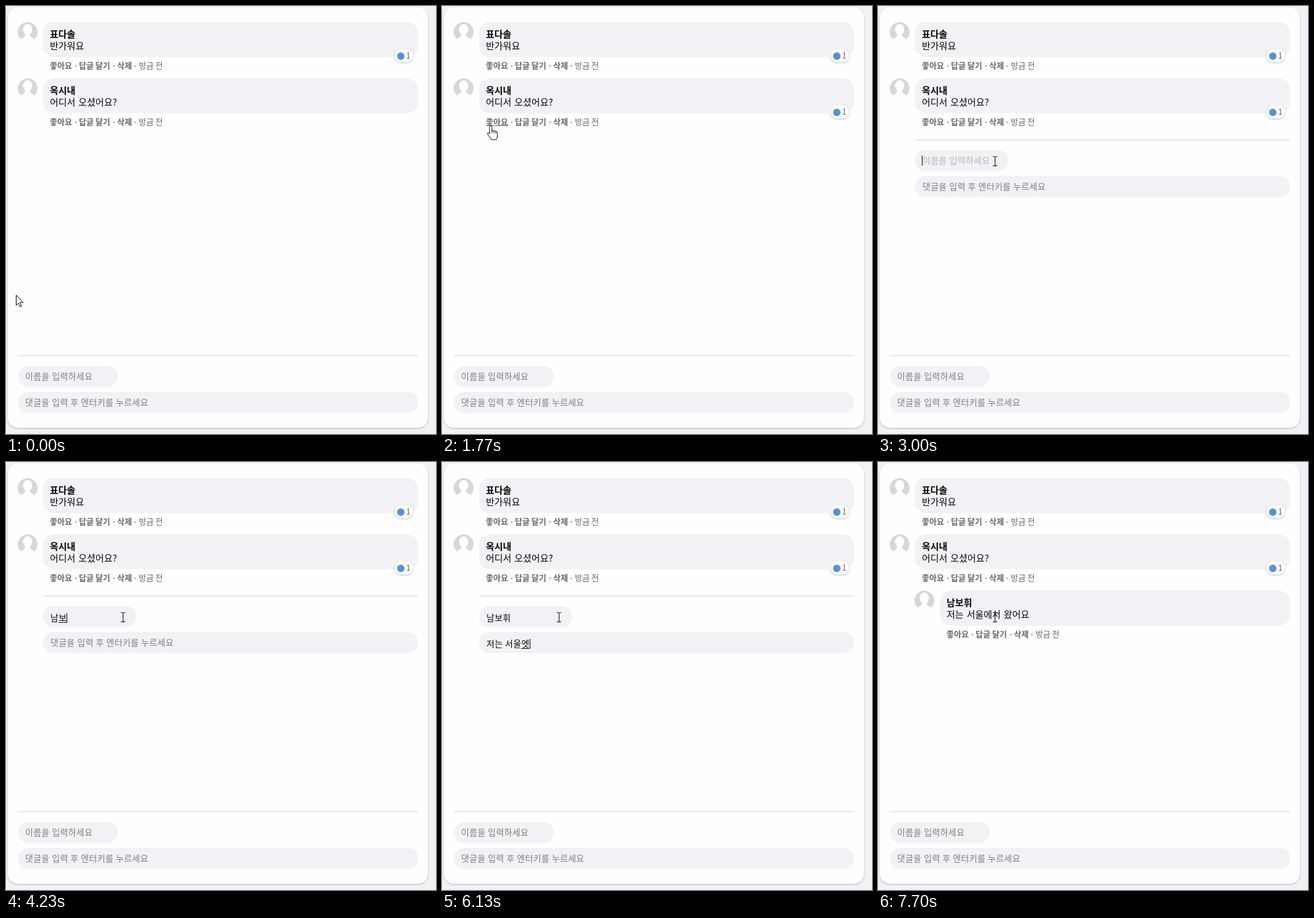
An HTML page with a canvas for the animation above (8 s loop, 696 by 692 pixels).

```html
<!DOCTYPE html>
<html lang="ko">
<head>
<meta charset="utf-8">
<style>
html, body { margin: 0; width: 100%; height: 100%; overflow: hidden; background: #f0f2f5; }
canvas { display: block; }
</style>
</head>
<body>
<canvas id="stage" width="696" height="692"></canvas>
<script>
const ctx = document.getElementById('stage').getContext('2d');
const LOOP = 8000;
const FONT = '"Noto Sans CJK KR", "Noto Sans CJK", "Noto Sans CJK JP", sans-serif';
const C = {
  page: '#f0f2f5', card: '#fefefe', bubble: '#f0f2f5', line: '#d0d2d4', avatar: '#d6d7da',
  ink: '#050505', action: '#65676b', hint: '#7c7d80', hintDim: '#b6b7ba', like: '#5590e0'
};
const BODY = { size: 15, word: 1.5 };
const BOLD = { ...BODY, weight: 700 };
const INPUT = { size: 14, letter: 0.3, word: 0.3 };
const SMALL = { size: 13 };
const LINK = { size: 13, weight: 700 };

const LIKE_AT = 1400, FORM_AT = 2250, FOCUS_AT = 2750, TAB_AT = 4850, COMMIT_AT = 7630, SEND_AT = 7660;
const NAME = '남보휘', REPLY = '저는 서울에서 왔어요';

// Each key press yields one state of the syllable being composed.
const keys = (start, step, prefix, states) =>
  states.split('|').map((s, i) => ({ t: start + i * step, text: prefix + s }));

const nameKeys = keys(3300, 200, '', 'ㄴ|나|남|남ㅂ|남보|남봏|남보후|남보휘');
const replyKeys = [
  ...keys(5030, 0, '', 'ㅈ'),
  ...keys(5230, 75, '', '저|전|저느|저는|저는 |저는 ㅅ|저는 서|저는 성|저는 서우|저는 서울|저는 서울ㅇ|저는 서울에'),
  ...keys(6130, 100, '저는 서울', '엣|에서|에서 |에서 ㅇ|에서 오|에서 와'),
  ...keys(7070, 100, '저는 서울에서 ', '왔|왔ㅇ|왔어|왔엉|왔어요')
];

const pointer = [
  [0, 16, 467], [50, 16, 467], [700, 91, 185], [900, 91, 185], [1150, 79, 193],
  [1820, 79, 193], [2150, 140, 190], [2330, 140, 190], [2700, 189, 251], [LOOP, 189, 251]
];
const ARROW = new Path2D('M.5.5V17L4.2 13.4 6.8 19.3 9.2 18.3 6.6 12.4H11.8Z');
const HAND = new Path2D('M-2 2.3a1.9 1.9 0 0 1 3.8 0V8.5q2.4-1 3.2.7 2.3-.8 3 .9 2.7-.4 2.7 2.3V17q0 3-1.8 6H.6Q-1 19.5-5 14.5q-1.4-2.6.8-2.7L-2 14Z');

function box(x, y, w, h, r, fill) {
  ctx.fillStyle = fill;
  ctx.beginPath();
  ctx.roundRect(x, y, w, h, r);
  ctx.fill();
}

function rect(x, y, w, h, fill) {
  ctx.fillStyle = fill;
  ctx.fillRect(x, y, w, h);
}

function disc(x, y, r, fill) {
  ctx.fillStyle = fill;
  ctx.beginPath();
  ctx.arc(x, y, r, 0, 7);
  ctx.fill();
}

function shadowed(draw) {
  ctx.save();
  ctx.shadowColor = 'rgba(0, 0, 0, 0.25)';
  ctx.shadowBlur = 3;
  ctx.shadowOffsetY = 1;
  draw();
  ctx.restore();
}

// Places text by its visual middle and returns its width.
function label(text, x, mid, style, color) {
  const { size, weight = 400, letter = 0, word = 0 } = style;
  ctx.font = `${weight} ${size}px ${FONT}`;
  ctx.letterSpacing = letter + 'px';
  ctx.wordSpacing = word + 'px';
  ctx.fillStyle = color;
  ctx.fillText(text, x, Math.round(mid + size * 0.38));
  return ctx.measureText(text).width;
}

function avatar(x, y) {
  ctx.save();
  ctx.beginPath();
  ctx.arc(x, y, 16, 0, 7);
  ctx.clip();
  rect(x - 16, y - 16, 32, 32, C.avatar);
  ctx.fillStyle = C.card;
  ctx.beginPath();
  ctx.ellipse(x, y - 4, 7.5, 9, 0, 0, 7);
  ctx.fill();
  ctx.fill(new Path2D(`M${x - 4} ${y}h8v6q1 3 8 5v7h-24v-7q7-2 8-5Z`));
  ctx.restore();
}

function badge(y) {
  shadowed(() => box(629, y, 30, 22, 11, C.card));
  disc(639, y + 12, 6, C.like);
  label('1', 647.5, y + 11, SMALL, C.action);
}

function comment(x, y, name, text, liked, hover) {
  avatar(x + 16, y + 16);
  box(x + 41, y, 626 - x, 56.5, 18, C.bubble);
  const left = x + 52;
  label(name, left, y + 19, BOLD, C.ink);
  label(text, left, y + 38, BODY, C.ink);
  const mid = y + 70;
  label('좋아요', left, mid, LINK, C.action);
  label('답글 달기', left + 47, mid, LINK, C.action);
  label('삭제', left + 109, mid, LINK, C.action);
  label('방금 전', left + 144, mid, SMALL, C.action);
  for (const dx of [42, 104, 138]) disc(left + dx, mid + 1, 0.9, C.action);
  if (hover === 'like') rect(left, mid + 6, 36, 1, C.action);
  if (hover === 'reply') rect(left + 47, mid + 6, 51, 1, C.action);
  if (liked) badge(y + 43);
}

function field(x, y, w, hint, state) {
  box(x, y, w, 34, 17, C.bubble);
  const left = x + 12, mid = y + 17;
  const { text = '', focus = false, composing = false, caret = false } = state || {};
  let end = left;
  if (text) {
    end += label(text, left, mid + 1.5, INPUT, C.ink);
    if (composing && !text.endsWith(' ')) {
      const last = ctx.measureText(text.slice(-1)).width;
      rect(Math.round(end - last), mid + 9, Math.round(last), 1, C.ink);
    }
  } else {
    label(hint, left, mid - 0.5, INPUT, focus ? C.hintDim : C.hint);
  }
  if (caret) rect(Math.round(end) - (text ? 0 : 1), mid + (text ? -6 : -8), 1, 16, '#000');
}

function form(x, y, nameWidth, name, reply) {
  rect(x, y, 667 - x, 1, C.line);
  field(x, y + 17, nameWidth, '이름을 입력하세요', name);
  field(x, y + 59, 667 - x, '댓글을 입력 후 엔터키를 누르세요', reply);
}

function typing(t, list, from, to) {
  const last = list.filter(k => k.t <= t).pop();
  const focus = t >= from && t < to;
  const since = t - (last ? last.t : from);
  return {
    text: last ? last.text : '',
    focus,
    composing: focus && !!last,
    caret: focus && since % 1060 < 530
  };
}

function pointerAt(t) {
  const i = Math.max(1, pointer.findIndex(p => p[0] > t));
  const [t0, x0, y0] = pointer[i - 1], [t1, x1, y1] = pointer[i];
  const u = (t - t0) / (t1 - t0), e = u * u * (3 - 2 * u);
  return [x0 + (x1 - x0) * e, y0 + (y1 - y0) * e];
}

function drawPointer(x, y, kind) {
  x = Math.round(x);
  y = Math.round(y);
  if (kind === 'text') {
    rect(x, y - 7, 1, 15, '#000');
    for (const dy of [-8, 7]) {
      rect(x - 3, y + dy, 3, 1, '#000');
      rect(x + 1, y + dy, 3, 1, '#000');
    }
    return;
  }
  ctx.save();
  ctx.translate(x, y);
  ctx.fillStyle = '#fff';
  ctx.strokeStyle = '#000';
  ctx.lineWidth = 1;
  const shape = kind === 'hand' ? HAND : ARROW;
  ctx.fill(shape);
  ctx.stroke(shape);
  if (kind === 'hand') ctx.stroke(new Path2D('M1.8 8v4M5 9.5v3M8 10.5v2.5'));
  ctx.restore();
}

function draw(t) {
  const [px, py] = pointerAt(t);
  const onRow = py >= 179 && py <= 196;
  const hover = onRow && px >= 71 && px <= 107 ? 'like' : onRow && px >= 118 && px <= 169 ? 'reply' : '';
  const formOpen = t >= FORM_AT && t < SEND_AT;

  rect(0, 0, 696, 692, C.page);
  shadowed(() => box(3, 2, 680, 680, 16, C.card));
  comment(19, 26, '표다솔', '반가워요', true);
  comment(19, 117, '옥시내', '어디서 오셨어요?', t >= LIKE_AT, hover);
  if (formOpen) {
    form(60, 216, 151, typing(t, nameKeys, FOCUS_AT, TAB_AT), typing(t, replyKeys, TAB_AT, COMMIT_AT));
  }
  if (t >= SEND_AT) comment(59, 208, NAME, REPLY);
  form(19, 565, 162);

  const overText = t >= SEND_AT || (formOpen && py >= 233);
  drawPointer(px, py, overText ? 'text' : hover ? 'hand' : 'arrow');
}

const begin = performance.now();
function tick() {
  draw((performance.now() - begin) % LOOP);
  requestAnimationFrame(tick);
}
tick();
</script>
</body>
</html>
```
